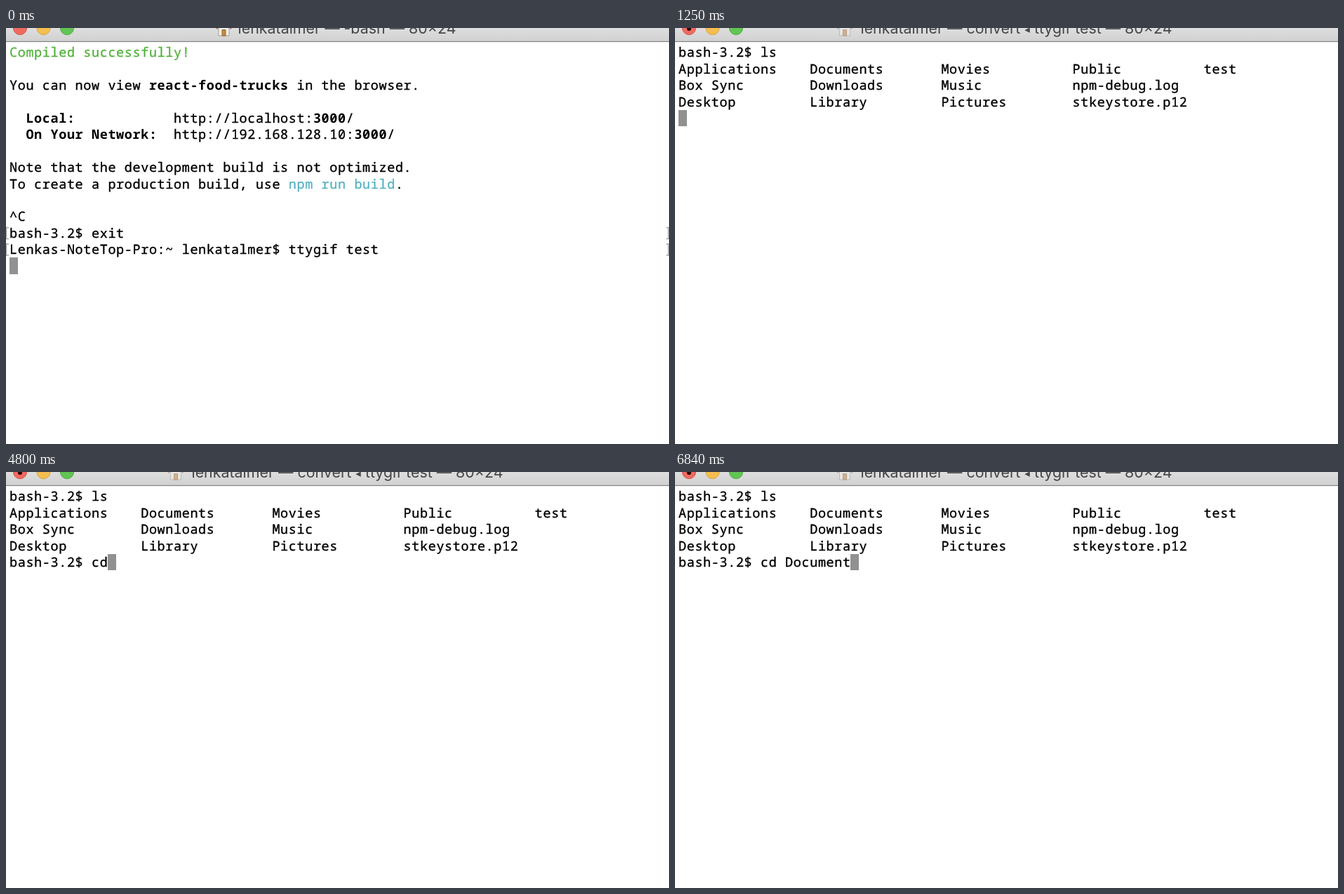
Animation of 945 by 593 pixels, one loop 8000 ms. Source, as an HTML page:

```html
<!DOCTYPE html>
<html lang="en">
<head>
<meta charset="utf-8">
<title>Terminal</title>
<style>
  html, body { margin: 0; width: 100%; height: 100%; overflow: hidden; background: #fff; }
  #stage { position: relative; width: 945px; height: 593px; overflow: hidden; background: #fff; }
  svg { position: absolute; left: 0; top: 0; }
  #bar text { font: 400 21.4px Inter, sans-serif; fill: #464646; text-anchor: middle; }
  #screen {
    position: absolute; left: 5px; top: 23.4px; margin: 0;
    font: 500 18.5px/23.4px "Noto Sans Mono", monospace;
    letter-spacing: .6px; font-variant-ligatures: none;
    text-rendering: geometricPrecision; color: #000;
    -webkit-text-stroke: .35px currentColor;
  }
  #screen b { font-weight: 700; -webkit-text-stroke: 0; }
  .ok { color: #54b33c; }
  .cmd { color: #58b3c4; }
  #cursor { position: absolute; width: 12px; background: #919191; }
</style>
</head>
<body>
<div id="stage">
  <svg id="bar" width="945" height="351">
    <defs>
      <linearGradient id="metal" x1="0" y1="0" x2="0" y2="1">
        <stop offset="0" stop-color="#dedede"/>
        <stop offset="1" stop-color="#d1d1d1"/>
      </linearGradient>
      <g id="house">
        <path d="M3 -3H18V11H3Z" fill="#f3f1ee" stroke="#a79c92"/>
        <path d="M0 1L10.5 -10L21 1" fill="none" stroke="#96594a" stroke-width="2"/>
        <path d="M8 2.5H13V11H8Z" fill="#c98a3c" stroke="#8d6434"/>
      </g>
    </defs>
    <rect width="945" height="19" fill="url(#metal)"/>
    <rect y="18.8" width="945" height="1.2" fill="#858585"/>
    <circle cx="20" r="9.6" fill="#ee6a5f" stroke="#d5564c"/>
    <circle cx="53.5" r="9.6" fill="#f5be4f" stroke="#d8a23f"/>
    <circle cx="87" r="9.6" fill="#61c554" stroke="#4faa40"/>
    <g id="idle">
      <use href="#house" x="300"/>
      <text x="486" y="8">lenkatalmer — -bash — 80×24</text>
      <path d="M4 284.5H.5V300.5H4M4 308H.5V324H4M941 284.5H944.2V300.5H941M941 308H944.2V324H941"
        fill="none" stroke="#a8a8a8" stroke-width="1.5"/>
    </g>
    <g id="busy">
      <circle cx="20" cy="1" r="3" fill="#2b0502"/>
      <use href="#house" x="231.5" opacity=".5"/>
      <text x="486.5" y="8">lenkatalmer — convert <tspan dy="-1.5" font-size="15" font-family="DejaVu Sans, sans-serif">◂</tspan><tspan dy="1.5"> ttygif test — 80×24</tspan></text>
    </g>
  </svg>
  <div id="cursor"></div>
  <pre id="screen"></pre>
</div>
<script>
const LOOP = 8000, CELL = 11.7, LINE = 23.4, LEFT = 5;
const $ = id => document.getElementById(id);

const intro = [
  '<span class="ok">Compiled successfully!</span>',
  '',
  'You can now view <b>react-food-trucks</b> in the browser.',
  '',
  '  <b>Local:</b>            http://localhost:<b>3000</b>/',
  '  <b>On Your Network:</b>  http://192.168.128.10:<b>3000</b>/',
  '',
  'Note that the development build is not optimized.',
  'To create a production build, use <span class="cmd">npm run build</span>.',
  '',
  '^C',
  'bash-3.2$ exit',
  'Lenkas-NoteTop-Pro:~ lenkatalmer$ ttygif test',
  ''
].join('\n');

const prompt = 'bash-3.2$ ';
const listing = prompt + 'ls\n' + [
  ['Applications', 'Documents', 'Movies', 'Public', 'test'],
  ['Box Sync', 'Downloads', 'Music', 'npm-debug.log'],
  ['Desktop', 'Library', 'Pictures', 'stkeystore.p12']
].map(row => row.map(name => name.padEnd(16)).join('').trimEnd() + '\n').join('');

const typed = 'cd Document';
const keyTimes = [3390, 4800, 5200, 5360, 5840, 5940, 6160, 6260, 6370, 6470, 6840];

// [start time, screen content]; the cursor sits after the last character
const steps = [
  [0, intro],
  [500, prompt],
  [860, prompt + 'l'],
  [1150, prompt + 'ls'],
  [1250, listing],
  [3120, listing + prompt],
  ...keyTimes.map((t, i) => [t, listing + prompt + typed.slice(0, i + 1)])
];

function show(i) {
  const screen = $('screen'), cursor = $('cursor').style;
  screen.innerHTML = steps[i][1];
  const lines = screen.textContent.split('\n');
  const row = lines.length - 1, col = lines[row].length;
  const top = Math.floor(LINE * (row + 1));
  cursor.left = Math.floor(LEFT + CELL * col + .01) + 'px';
  cursor.top = top + 'px';
  cursor.height = Math.round(LINE * (row + 2)) - top + 'px';
  $('idle').style.display = i ? 'none' : '';
  $('busy').style.display = i ? '' : 'none';
}

const start = performance.now();
let current = -1;

function tick() {
  const t = (performance.now() - start) % LOOP;
  const i = steps.findLastIndex(step => step[0] <= t);
  if (i !== current) show(current = i);
  requestAnimationFrame(tick);
}
tick();
</script>
</body>
</html>
```
